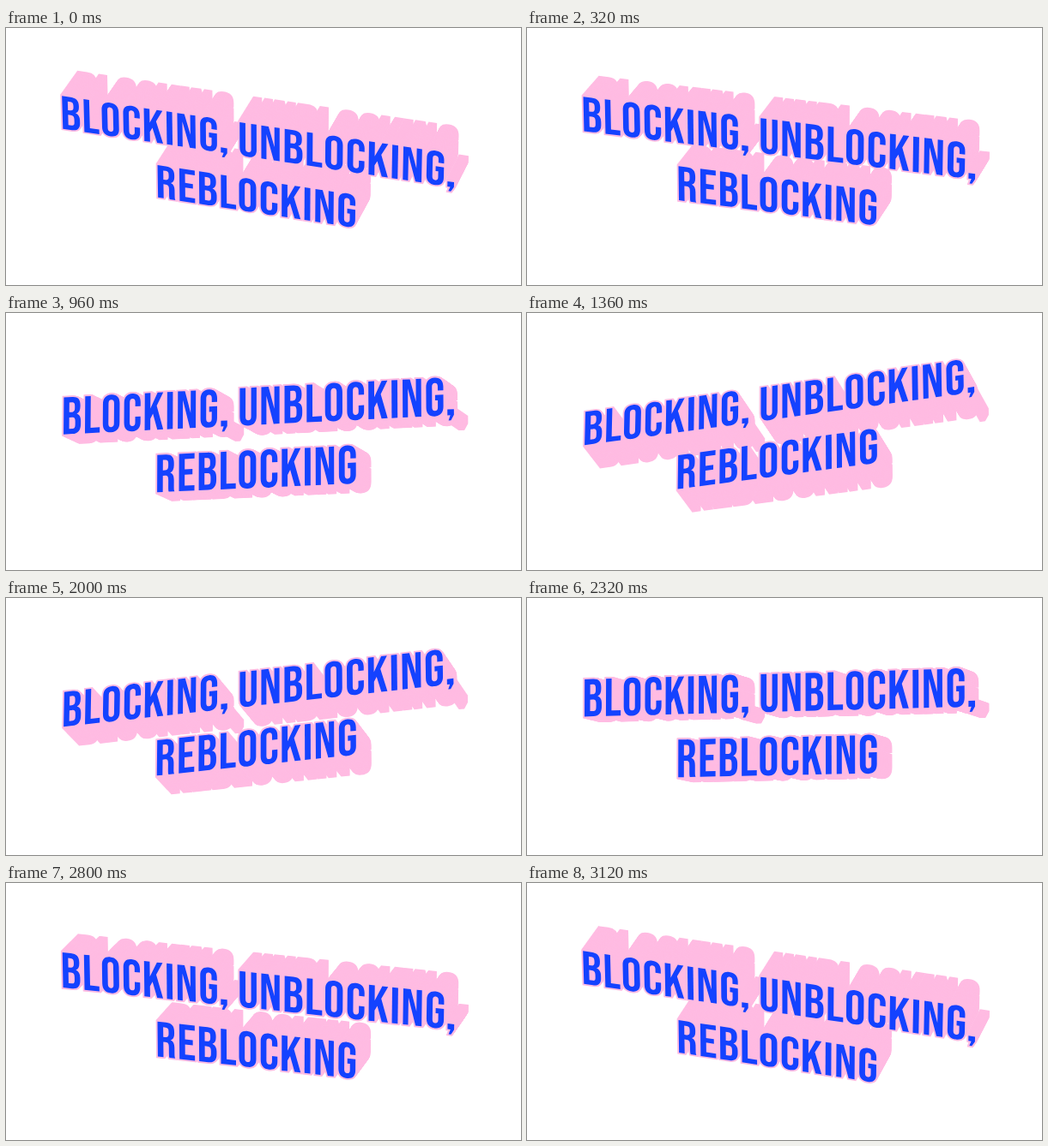
An HTML page with a canvas for the animation above (3200 ms loop, 600x300 px).

```html
<!DOCTYPE html>
<html lang="en">
<head>
<meta charset="utf-8">
<title>Blocking, unblocking, reblocking</title>
<style>
  html, body { margin: 0; width: 100%; height: 100%; overflow: hidden; background: #fff; }
  canvas { display: block; }
</style>
</head>
<body>
<canvas width="600" height="300" role="img" aria-label="Blocking, unblocking, reblocking">BLOCKING, UNBLOCKING, REBLOCKING</canvas>
<script>
const ctx = document.querySelector('canvas').getContext('2d');
const LOOP = 3200, STEP = 80;
const DEPTH = 60, LAYERS = 40, CAMERA = 4500;
const TURN = 16.7 * Math.PI / 180, TILT = Math.PI / 6;
const SCALE = 0.063, TRACKING = 15.5, CAP = 700, LEADING = 74;
const BLUE = '#1442ff', PINK = '#ffbbe2';

// Condensed capitals: [advance, outline], cap height 700, y pointing down
const GLYPHS = {
  B: [407, 'M41 0H207C320 0 368 53 368 161V186C368 257 346 302 298 322C356 342 380 393 380 465V522C380 637 325 700 219 700H41Z M151 100V285H194C235 285 260 267 260 211V172C260 122 243 100 204 100Z M151 385V600H217C252 600 270 584 270 529V468C270 405 250 385 202 385Z'],
  L: [340, 'M41 0H151V600H332V700H41Z'],
  O: [402, 'M36 166C36 54 94 -8 201 -8S366 54 366 166V534C366 646 308 708 201 708S36 646 36 534Z M146 159V541C146 588 166 608 201 608S256 588 256 541V159C256 112 236 92 201 92S146 112 146 159Z'],
  C: [384, 'M36 166C36 54 92 -8 197 -8S358 54 358 166V239H254V159C254 112 234 92 200 92S146 112 146 159V541C146 588 166 608 200 608S254 588 254 541V435H358V534C358 646 302 708 197 708S36 646 36 534Z'],
  K: [422, 'M41 0H151V295L291 0H401L274 247L403 700H288L201 394L151 488V700H41Z'],
  I: [192, 'M41 0H151V700H41Z'],
  N: [430, 'M41 0H179L291 419V0H390V700H277L139 169V700H41Z'],
  G: [392, 'M36 166C36 54 92 -8 197 -8S358 54 358 166V234H254V159C254 112 234 92 200 92S146 112 146 159V541C146 588 166 608 200 608S254 588 254 541V415H204V315H358V534C358 646 302 708 197 708S36 646 36 534Z'],
  U: [394, 'M37 0H147V542C147 589 167 608 201 608S255 589 255 542V0H359V535C359 647 303 708 198 708S37 647 37 535Z'],
  R: [408, 'M41 0H204C317 0 366 53 366 161V208C366 280 342 325 294 345C348 362 367 412 367 487V614C367 650 368 676 380 700H268C262 683 258 673 258 613V484C258 415 242 395 194 395H151V700H41Z M151 100V295H191C229 295 256 278 256 225V170C256 121 239 100 200 100Z'],
  E: [368, 'M41 0H341V100H151V295H302V395H151V600H341V700H41Z'],
  ',': [180, 'M24 592H146V697L90 795H44L78 700H24Z'],
  ' ': [140, '']
};
const paths = {};
for (const ch in GLYPHS) paths[ch] = new Path2D(GLYPHS[ch][1]);

function layout(text, middle) {
  const advance = ch => (GLYPHS[ch][0] + TRACKING) * SCALE;
  let x = -[...text].reduce((sum, ch) => sum + advance(ch), 0) / 2;
  return [...text].map(ch => {
    const letter = { path: paths[ch], x, y: middle - CAP * SCALE / 2 };
    x += advance(ch);
    return letter;
  });
}
const letters = [
  ...layout('BLOCKING, UNBLOCKING,', -LEADING / 2),
  ...layout('REBLOCKING', LEADING / 2)
];

function project(x, y, z, tilt) {
  const x1 = x * Math.cos(TURN) - z * Math.sin(TURN);
  const z1 = x * Math.sin(TURN) + z * Math.cos(TURN);
  const y2 = y * Math.cos(tilt) + z1 * Math.sin(tilt);
  const z2 = z1 * Math.cos(tilt) - y * Math.sin(tilt);
  const k = CAMERA / (CAMERA - z2);
  return [300 + x1 * k, 150 + y2 * k];
}

// Perspective is gentle enough to treat each letter as affine
function drawLayer(z, tilt, outlined) {
  const w = 400, h = CAP;
  for (const { path, x, y } of letters) {
    const [ox, oy] = project(x, y, z, tilt);
    const [rx, ry] = project(x + w * SCALE, y, z, tilt);
    const [bx, by] = project(x, y + h * SCALE, z, tilt);
    ctx.setTransform((rx - ox) / w, (ry - oy) / w, (bx - ox) / h, (by - oy) / h, ox, oy);
    ctx.fill(path, 'evenodd');
    if (outlined) ctx.stroke(path);
  }
}

function frame(now) {
  const t = Math.floor(now / STEP) * STEP % LOOP;
  const tilt = TILT * Math.cos(2 * Math.PI * t / LOOP);
  ctx.resetTransform();
  ctx.fillStyle = '#fff';
  ctx.fillRect(0, 0, 600, 300);
  ctx.fillStyle = ctx.strokeStyle = PINK;
  ctx.lineWidth = 62;
  ctx.miterLimit = 2;
  for (let i = 0; i <= LAYERS; i++) drawLayer(DEPTH * (i / LAYERS - 0.5), tilt, true);
  ctx.fillStyle = BLUE;
  drawLayer(DEPTH / 2, tilt, false);
}

function tick() {
  frame(performance.now());
  requestAnimationFrame(tick);
}
tick();
</script>
</body>
</html>
```
